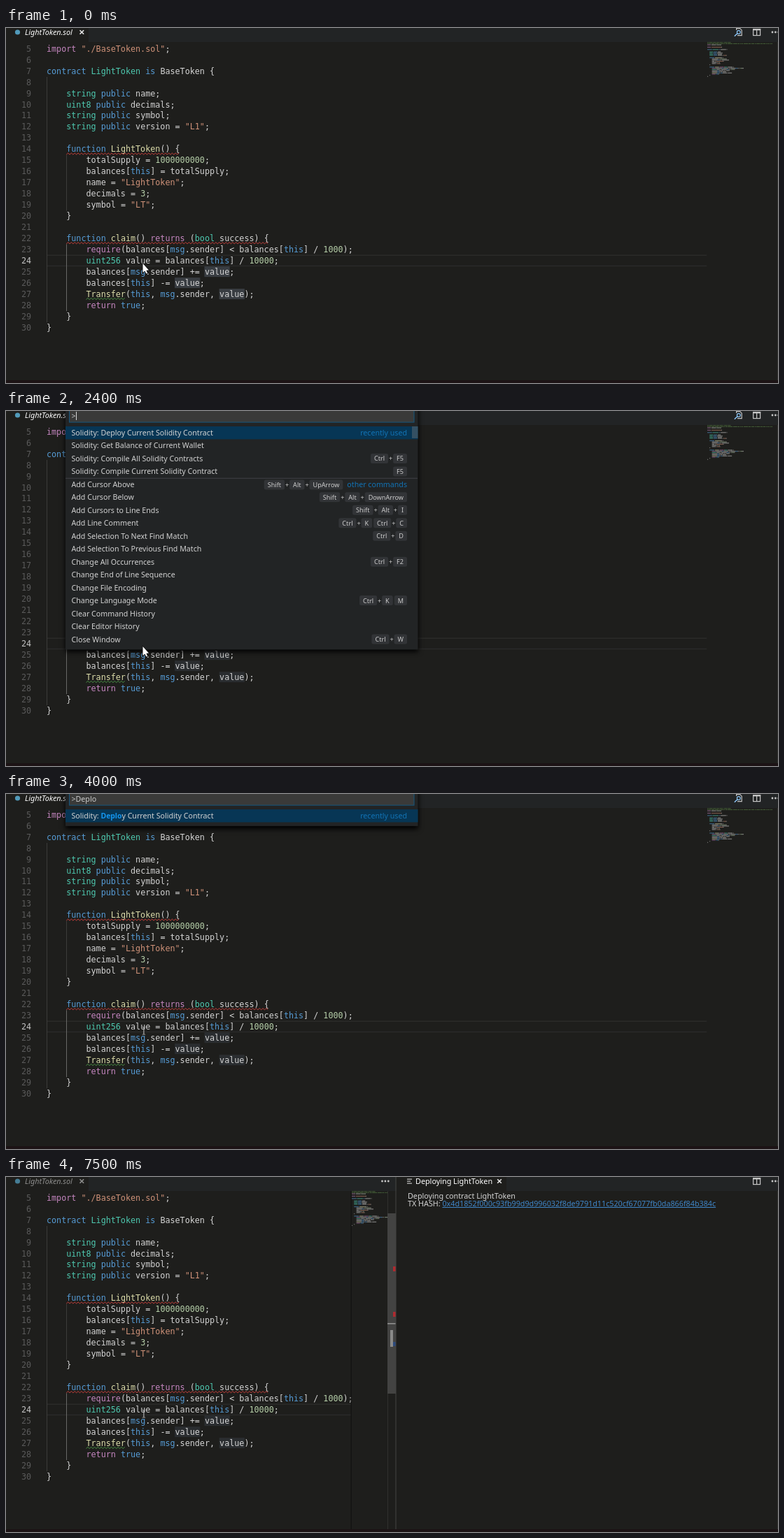
Recreate the animation shown at these times as an HTML page with a canvas. Size 1103 px wide and 508 px high, loop 8 s.

```html
<!DOCTYPE html>
<html lang="en">
<head>
<meta charset="utf-8">
<title>Deploying a contract from the editor</title>
<style>
html, body { margin: 0; width: 100%; height: 100%; overflow: hidden; background: #1e1e1c; }
canvas { display: block; }
</style>
</head>
<body>
<canvas id="stage" width="1103" height="508"></canvas>
<script>
const ctx = document.getElementById('stage').getContext('2d');
const W = 1103, H = 508, LOOP = 8000;
const UI = '"Noto Sans", "Open Sans", sans-serif';
const CODE_FONT = '11.727px "DejaVu Sans Mono", monospace';
const UI_FONT = '10.65px ' + UI;
const TAB_FONT = '10.8px ' + UI;
const BOLD_FONT = 'bold 10.4px ' + UI;
const KEY_FONT = '9.1px ' + UI;
const WEB_FONT = '10.76px ' + UI;
const CHAR = 7.06, LINE = 15.96, LEFT = 58;
const BG = '#1e1e1c', BAR = '#222425';
const BLUE = '#569cd6', TEAL = '#4ec9b0', PURPLE = '#c586c0', ORANGE = '#ce9178',
  GREEN = '#b5cea8', YELLOW = '#dcdcaa', PLAIN = '#d4d4d4', COMMENT = '#608b4e';

const SOURCE = `// Simple token that hands a small share
// The whole supply is held by the contract itself, and it is claimed from there by anyone who asks it to do so
pragma solidity ^0.4.18;

import "./BaseToken.sol";

contract LightToken is BaseToken {

    string public name;
    uint8 public decimals;
    string public symbol;
    string public version = "L1";

    function LightToken() {
        totalSupply = 1000000000;
        balances[this] = totalSupply;
        name = "LightToken";
        decimals = 3;
        symbol = "LT";
    }

    function claim() returns (bool success) {
        require(balances[msg.sender] < balances[this] / 1000);
        uint256 value = balances[this] / 10000;
        balances[msg.sender] += value;
        balances[this] -= value;
        Transfer(this, msg.sender, value);
        return true;
    }
}`;

const WORDS = {};
const group = (words, color) => words.split(' ').forEach(w => WORDS[w] = color);
group('contract is function public this msg true', BLUE);
group('string uint8 uint256 bool', TEAL);
group('import pragma returns require return', PURPLE);

function tokenize(line) {
  const out = [];
  for (const m of line.matchAll(/\/\/.*|"[^"]*"|\w+|[^\w\s"]+/g)) {
    const s = m[0], next = line[m.index + s.length];
    let color = PLAIN;
    if (s.startsWith('//')) color = COMMENT;
    else if (s[0] === '"') color = ORANGE;
    else if (/^\d/.test(s)) color = GREEN;
    else if (WORDS[s]) color = WORDS[s];
    else if (next === '(' && /\w/.test(s)) color = YELLOW;
    else if (/contract $/.test(line.slice(0, m.index))) color = TEAL;
    out.push({ s, col: m.index, color });
  }
  return out;
}
const CODE = SOURCE.split('\n').map(tokenize);

const COMMANDS = [
  ['Solidity: Deploy Current Solidity Contract', '', 'recently used'],
  ['Solidity: Get Balance of Current Wallet'],
  ['Solidity: Compile All Solidity Contracts', 'Ctrl+F5'],
  ['Solidity: Compile Current Solidity Contract', 'F5'],
  ['Add Cursor Above', 'Shift+Alt+UpArrow', 'other commands'],
  ['Add Cursor Below', 'Shift+Alt+DownArrow'],
  ['Add Cursors to Line Ends', 'Shift+Alt+I'],
  ['Add Line Comment', 'Ctrl+K Ctrl+C'],
  ['Add Selection To Next Find Match', 'Ctrl+D'],
  ['Add Selection To Previous Find Match'],
  ['Change All Occurrences', 'Ctrl+F2'],
  ['Change End of Line Sequence'],
  ['Change File Encoding'],
  ['Change Language Mode', 'Ctrl+K M'],
  ['Clear Command History'],
  ['Clear Editor History'],
  ['Close Window', 'Ctrl+W']
];
const DEPLOY = COMMANDS[0];
const ATTACH = ['Debug: Attach to Node Process', '', 'other commands'];
const PREVIOUS = ['Debug: Go To Previous Breakpoint'];
const PAUSE = ['Debug: Pause', 'F6'];
const DE_COMMANDS = [
  DEPLOY, ATTACH,
  ['Debug: Continue', 'F5'],
  ['Debug: Disable All Breakpoints'],
  ['Debug: Enable All Breakpoints'],
  ['Debug: Go To Next Breakpoint'],
  PREVIOUS,
  ['Debug: Open launch.json'],
  PAUSE,
  ['Debug: Restart', 'Ctrl+Shift+F5'],
  ['Debug: Start Without Debugging'],
  ['Debug: Step Into', 'F11'],
  ['Debug: Step Out', 'Shift+F11'],
  ['Debug: Step Over', 'F10'],
  ['Debug: Stop', 'Shift+F5'],
  ['Debug: Toggle Breakpoint', 'F9'],
  ['Delete All Left']
];
const DEP_COMMANDS = [
  DEPLOY, ATTACH, PREVIOUS, PAUSE,
  ['Developer: Open Process Explorer'],
  ['Developer: Startup Performance'],
  ['Developer: Toggle Shared Process']
];

function rect(x, y, w, h, color) {
  ctx.fillStyle = color;
  ctx.fillRect(x, y, w, h);
}

function text(s, x, y, font, color, align = 'left') {
  ctx.font = font;
  ctx.fillStyle = color;
  ctx.textAlign = align;
  ctx.fillText(s, x, y);
  return ctx.measureText(s).width;
}

function path(points, color, width = 1) {
  ctx.beginPath();
  points.forEach(([x, y]) => ctx.lineTo(x, y));
  ctx.strokeStyle = color;
  ctx.lineWidth = width;
  ctx.stroke();
}

function dot(x, y, r, color) {
  ctx.beginPath();
  ctx.arc(x, y, r, 0, 7);
  ctx.fillStyle = color;
  ctx.fill();
}

const baseline = n => 33.7 + (n - 5) * LINE;
const column = c => LEFT + c * CHAR;

function squiggle(n, from, to, color) {
  const pts = [];
  for (let x = column(from), up = 0; x <= column(to); x += 2.4, up ^= 1)
    pts.push([x, baseline(n) + (up ? 1.6 : 3.8)]);
  path(pts, color, 0.9);
}

function guide(c, from, to, color) {
  rect(Math.round(column(c)), baseline(from) - 11.6, 1, (to - from + 1) * LINE, color);
}

function drawCode(right, focused) {
  ctx.save();
  ctx.beginPath();
  ctx.rect(0, 20, right, H - 20);
  ctx.clip();
  rect(LEFT, 324.5, right - LEFT, 1.5, '#2a2a29');
  rect(LEFT, 339.7, right - LEFT, 1.5, '#2a2a29');
  guide(0, 8, 29, '#3c3c3a');
  guide(4, 15, 19, '#3c3c3a');
  guide(4, 23, 28, '#686866');
  for (const [n, c] of [[25, 32], [26, 26], [27, 35]])
    rect(column(c) - 0.5, baseline(n) - 11.7, 5 * CHAR + 1, 15, focused ? '#393d42' : '#2a2d30');
  for (let n = 5; n <= 30; n++) {
    text(n, 36, baseline(n), CODE_FONT, n === 24 ? '#c2c2c2' : '#5a5a5a', 'right');
    for (const k of CODE[n - 1]) text(k.s, column(k.col), baseline(n), CODE_FONT, k.color);
  }
  squiggle(14, 4, 27, '#d8433f');
  squiggle(22, 4, 45, '#d8433f');
  squiggle(27, 8, 16, '#4f9f4a');
  ctx.restore();
}

function drawMinimap(x, right) {
  ctx.save();
  ctx.beginPath();
  ctx.rect(x, 20, right - x, 60);
  ctx.clip();
  ctx.globalAlpha = 0.7;
  CODE.forEach((line, i) => {
    for (const k of line)
      for (let j = 0; j < k.s.length; j++)
        if (k.s[j] !== ' ') rect(x + 1 + (k.col + j) * 0.838, 20.2 + i * 1.676, 0.75, 1.1, k.color);
  });
  ctx.restore();
}

function cross(x, color) {
  path([[x - 2.8, 3.2], [x + 2.8, 8.8]], color, 1.6);
  path([[x + 2.8, 3.2], [x - 2.8, 8.8]], color, 1.6);
}

function dots(x) {
  for (let i = 0; i < 3; i++) dot(x + i * 4.4, 6, 1.4, '#c5c5c5');
}

function splitIcon() {
  ctx.strokeStyle = '#c5c5c5';
  ctx.lineWidth = 1.2;
  ctx.strokeRect(1067.6, 1.6, 10, 9);
  rect(1067, 1, 11.2, 2.4, '#c5c5c5');
  rect(1072, 2, 1.2, 8.5, '#c5c5c5');
}

function findIcon() {
  path([[1043.6, 3], [1043.6, 0.6], [1048.6, 0.6], [1051.2, 3.2], [1051.2, 10.6], [1045, 10.6]], '#c5c5c5', 1.2);
  ctx.beginPath();
  ctx.arc(1046.8, 6, 2.4, 0, 7);
  ctx.strokeStyle = '#8cc4f4';
  ctx.lineWidth = 1.2;
  ctx.stroke();
  path([[1045, 7.8], [1040.8, 11.8]], '#8cc4f4', 1.5);
}

function drawFileTab(active) {
  rect(0, 0, 118, 20, BG);
  dot(16.5, 6, 3.6, active ? '#519aba' : '#457d95');
  text('LightToken.sol', 27, 10, 'italic ' + TAB_FONT, active ? '#ffffff' : '#8e8e8d');
  cross(108.3, active ? '#e8e8e8' : '#8e8e8d');
}

function drawOverview() {
  rect(545, 20, 1, 484, '#30302f');
  rect(545, 52, 12, 258, '#434342');
  rect(553, 128, 4, 7, '#b02a30');
  rect(553, 193, 4, 7, '#b02a30');
  rect(545, 209, 12, 1.6, '#90908f');
  rect(549, 219, 4, 24, '#8a8a89');
  rect(553, 236, 4, 6, '#2c4a7c');
}

function drawResult(t) {
  rect(557, 0, W - 557, H, BG);
  rect(557, 0, W - 557, 20, BAR);
  rect(558, 0, 157, 20, BG);
  rect(556.5, 0, 1, 504, '#444443');
  for (const [y, w] of [[2.5, 7], [5.5, 5], [8.5, 7]]) rect(573, y, w, 1.2, '#c5c5c5');
  text('Deploying LightToken', 585, 10, TAB_FONT, '#ffffff');
  cross(705, '#e8e8e8');
  splitIcon();
  dots(1095);
  if (t >= 4800) text('Deploying contract LightToken', 574, 30.5, WEB_FONT, PLAIN);
  if (t >= 7500) {
    const hash = '0x4d1852f000c93fb99d9d996032f8de9791d11c520cf67077fb0da866f84b384c';
    const x = 574 + text('TX HASH: ', 574, 42, WEB_FONT, PLAIN);
    const w = text(hash, x, 42, WEB_FONT, '#3f86c8');
    rect(x, 43, w, 1, '#3f86c8');
  }
}

function keyCap(label, right, y) {
  ctx.font = KEY_FONT;
  const w = ctx.measureText(label).width + 10;
  ctx.beginPath();
  ctx.roundRect(right - w, y - 7.3, w, 14, 2.5);
  ctx.fillStyle = '#323437';
  ctx.fill();
  text(label, right - w / 2, y + 3.2, KEY_FONT, '#cccccc', 'center');
  return right - w;
}

function keyCaps(chords, right, y) {
  for (const chord of chords.split(' ').reverse()) {
    chord.split('+').reverse().forEach((key, i) => {
      if (i) {
        text('+', right - 3.5, y + 3.2, KEY_FONT, '#cccccc', 'center');
        right -= 7;
      }
      right = keyCap(key, right, y);
    });
    right -= 2;
  }
}

// Wraps the matched letters in asterisks.
function mark(label, query) {
  if (!query) return label;
  if (label.includes(query)) return label.replace(query, '*$&*');
  return label.replace(/^De/, '*$&*').replace(/\bP/, '*$&*');
}

function drawRow([label, keys, note], i, y, query) {
  let x = 93.5, right = 573;
  mark(label, query).split('*').forEach((part, j) => {
    x += text(part, x, y + 3.7, j % 2 ? BOLD_FONT : UI_FONT, j % 2 ? '#1495ee' : '#d2d2d2');
  });
  if (note) right -= text(note, right, y + 3.7, UI_FONT, '#1273b5', 'right') + 6;
  if (keys) keyCaps(keys, right, y);
  if (note && i) rect(85, y - 10, 503, 1, '#3f3f46');
}

function drawPalette(query, rows, caret, thumb) {
  ctx.save();
  ctx.shadowColor = '#000';
  ctx.shadowBlur = 7;
  ctx.shadowOffsetY = 4;
  rect(85, -20, 503.5, 20 + 27.4 + rows.length * 18.47, BAR);
  ctx.restore();
  rect(90, 0, 493.5, 16.6, '#14567f');
  rect(91, 0, 491.5, 15.6, '#3a3a39');
  const w = text('>' + query, 93.5, 10.7, UI_FONT, '#cccccc');
  if (caret) rect(Math.round(93.5 + w), 1, 1, 12, '#d8d8d8');
  rect(85, 22, 503.5, 18.4, '#073655');
  rows.forEach((row, i) => {
    const shift = row[2] && i ? 0.6 : 0;
    drawRow(row, i, 31.3 + i * 18.47 + shift, query);
  });
  if (thumb) rect(580, 22, 8.5, 17, `rgba(121,121,121,${0.4 * thumb})`);
}

function paletteAt(t) {
  if (t < 2600) {
    const caret = t < 900 || Math.floor((t - 900) / 500) % 2 === 1;
    drawPalette('', COMMANDS, caret, t < 900 ? 0 : t < 1000 ? 0.5 : 1);
  } else if (t < 3100) drawPalette(t < 2700 ? 'D' : 'De', DE_COMMANDS, true, 1);
  else if (t < 3300) drawPalette('Dep', DEP_COMMANDS, true, 0);
  else drawPalette(t < 4000 ? 'Depl' : 'Deplo', [DEPLOY], t < 4000, 0);
}

function drawArrow() {
  const shape = [[195.5, 337], [195.5, 350], [198.4, 347.4], [200.3, 351.6],
    [202.2, 350.8], [200.4, 346.7], [204, 346.5]];
  ctx.beginPath();
  shape.forEach(([x, y]) => ctx.lineTo(x, y));
  ctx.closePath();
  ctx.strokeStyle = '#111';
  ctx.lineWidth = 1.4;
  ctx.stroke();
  ctx.fillStyle = '#fff';
  ctx.fill();
}

function drawBeam() {
  rect(196.4, 333.5, 1, 10.5, '#c8c8c8');
  rect(194.7, 333, 4.4, 0.9, '#a0a0a0');
  rect(194.7, 343.6, 4.4, 0.9, '#a0a0a0');
}

function draw(t) {
  const split = t >= 4400;
  rect(0, 0, W, H, BG);
  rect(0, 0, W, 20, BAR);
  drawFileTab(!split);
  drawCode(split ? 493.5 : 1001.5, t < 600);
  if (split) {
    rect(492.5, 20, 1.5, 484, '#141413');
    drawMinimap(493, 545);
    if (t >= 4500) drawOverview();
    dots(537.5);
    drawResult(t);
  } else {
    drawMinimap(1001, 1097);
    findIcon();
    splitIcon();
    dots(1095);
  }
  rect(W - 1, 20, 1, H - 20, '#30302f');
  rect(0, 504, W, 4, '#1c1315');
  if (t >= 600 && t < 4300) paletteAt(t);
  const beam = (t >= 100 && t < 400) || t >= 3100;
  if (beam) drawBeam(); else drawArrow();
}

function tick() {
  draw(performance.now() % LOOP);
  requestAnimationFrame(tick);
}
tick();
</script>
</body>
</html>
```
